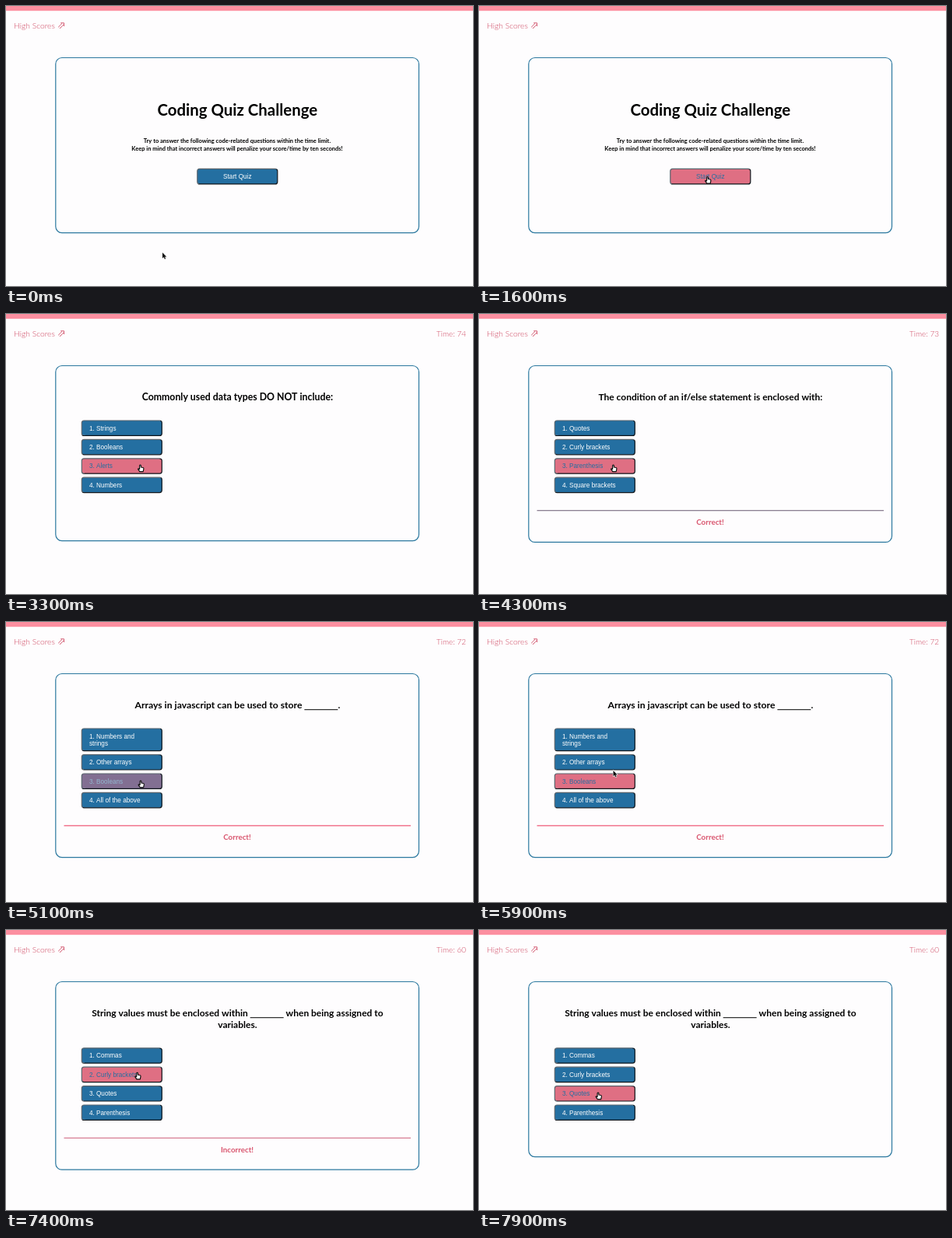
Animation of 600x360 px, one loop 8000 ms. Source, as an HTML page with a canvas:

```html
<!DOCTYPE html>
<html lang="en">
<head>
<meta charset="utf-8">
<title>Coding Quiz</title>
<style>
html, body { margin: 0; width: 100%; height: 100%; overflow: hidden; background: #fefdfe; }
canvas { display: block; }
</style>
</head>
<body>
<canvas id="stage" width="600" height="360"></canvas>
<script>
const ctx = document.getElementById('stage').getContext('2d');
const LOOP = 8000, STEP = 100, FADE = 400, MID = 297;
const BLUE = [36, 111, 161], PINK = [223, 111, 131], WHITE = [255, 255, 255];
const ROSE = '#cf4862';
const LATO = 'Lato, "Open Sans", sans-serif', ARIAL = '"Liberation Sans", Arial, sans-serif';

const screens = [
  { at: 0 },
  { at: 2000, ask: ['Commonly used data types DO NOT include:'], size: 12.3,
    options: ['Strings', 'Booleans', 'Alerts', 'Numbers'] },
  { at: 3600, ask: ['The condition of an if/else statement is enclosed with:'], size: 12,
    options: ['Quotes', 'Curly brackets', 'Parenthesis', 'Square brackets'],
    verdict: 'Correct!', rule: '#8b7f92' },
  { at: 4500, ask: ['Arrays in javascript can be used to store _.'], size: 12.2,
    options: ['Numbers and\nstrings', 'Other arrays', 'Booleans', 'All of the above'],
    verdict: 'Correct!', rule: '#f0627e' },
  { at: 6600, ask: ['String values must be enclosed within _ when being assigned to', 'variables.'], size: 12,
    options: ['Commas', 'Curly brackets', 'Quotes', 'Parenthesis'],
    verdict: 'Incorrect!', rule: '#d77f95', hide: 7700 }
];

// screen, button, pointer enters, pointer leaves
const hovers = [
  [0, 0, 1200, 2000], [1, 2, 2900, 3600], [2, 2, 3600, 4500], [3, 2, 4900, 5900],
  [3, 1, 6000, 6600], [4, 1, 6600, 7500], [4, 2, 7500, 8000]
];

// time, x, y of the pointer
const path = [
  [0, 201, 317], [600, 201, 317], [1400, 293.5, 219.5], [2700, 293.5, 219.5],
  [3200, 172.5, 194], [4600, 172.5, 194], [5000, 173, 204], [5800, 173, 204],
  [5900, 172.5, 191], [6100, 171.5, 178.5], [7300, 171.5, 178.5], [7700, 153, 209], [8000, 153, 209]
];

const arrow = new Path2D('M0 0V7.4L1.7 5.8L2.9 8.5L4.2 8L3 5.4H5.3Z');
const hand = new Path2D('M-.9 .8Q0-.6 .9 .8V3L3.6 3.5Q4.5 3.8 4.4 5L3.7 8.6H-.7L-2.9 5.4Q-2.6 4.2-.9 5.4Z');

const clamp = v => Math.max(0, Math.min(1, v));
const mix = (a, b, k) => `rgb(${a.map((v, i) => Math.round(v + (b[i] - v) * k))})`;

function write(str, x, y, font, color = '#000', align = 'center') {
  ctx.font = font;
  ctx.fillStyle = color;
  ctx.textAlign = align;
  ctx.fillText(str, x, y);
}

function box(x, y, w, h, r) {
  ctx.beginPath();
  ctx.roundRect(x, y, w, h, r);
}

function hoverLevel(screen, button, t) {
  let level = 0;
  for (const [s, b, start, end] of hovers)
    if (s === screen && b === button)
      level = Math.max(level, Math.min(clamp((t - start) / FADE), 1 - clamp((t - end) / FADE)));
  return level;
}

function button(x, y, h, label, level, centered) {
  const w = 103, cx = x + w / 2, cy = y + h / 2;
  const edge = ctx.createLinearGradient(cx - h, cy - w, cx + h, cy + w);
  edge.addColorStop(.5, '#59646d');
  edge.addColorStop(.5, '#10161c');
  box(x, y, w, h, 3);
  ctx.fillStyle = mix(BLUE, PINK, level);
  ctx.fill();
  ctx.strokeStyle = edge;
  ctx.lineWidth = 1.2;
  ctx.stroke();
  const color = mix(WHITE, BLUE, level), font = '8.2px ' + ARIAL;
  label.split('\n').forEach((line, i) =>
    write(line, centered ? cx : x + 9.6, y + 12.6 + i * 9.2, font, color, centered ? 'center' : 'left'));
}

// A "_" in the question stands for a ruled blank
function question(line, y, size) {
  const blank = 43, font = `bold ${size}px ${LATO}`;
  const parts = line.split('_');
  ctx.font = font;
  const widths = parts.map(p => ctx.measureText(p).width);
  let x = MID + .4 - (widths.reduce((a, b) => a + b) + blank * (parts.length - 1)) / 2;
  parts.forEach((part, i) => {
    if (i) {
      ctx.fillRect(x, y + 1.2, blank, 1);
      x += blank;
    }
    write(part, x, y, font, '#000', 'left');
    x += widths[i];
  });
}

function card(bottom) {
  box(63.8, 66.5, 466.7, bottom - 66.5, 8);
  ctx.strokeStyle = '#2b789f';
  ctx.lineWidth = 1.2;
  ctx.stroke();
}

function intro(t) {
  card(291.6);
  write('Coding Quiz Challenge', MID + .3, 141, 'bold 20.4px ' + LATO);
  const font = 'bold 7.5px ' + LATO;
  write('Try to answer the following code-related questions within the time limit.', MID, 176, font);
  write('Keep in mind that incorrect answers will penalize your score/time by ten seconds!', MID, 185.6, font);
  button(245.8, 209.3, 19.6, 'Start Quiz', hoverLevel(0, 0, t), true);
}

function quiz(index, t) {
  const s = screens[index];
  s.ask.forEach((line, i) => question(line, 111 + i * 15, s.size));
  let y = 137 + (s.ask.length - 1) * 14.8;
  s.options.forEach((text, i) => {
    const h = text.includes('\n') ? 28.6 : 19.4;
    button(97.3, y, h, `${i + 1}. ${text}`, hoverLevel(index, i, t));
    y += h + 5;
  });
  const shown = s.verdict && !(t >= s.hide);
  const ruleY = y + 18;
  card(shown ? ruleY + 40.8 : 291.6);
  if (shown) {
    ctx.fillStyle = s.rule;
    ctx.fillRect(74.5, ruleY - .6, 445.5, 1.3);
    write(s.verdict, MID, ruleY + 18.6, 'bold 9.8px ' + LATO, '#d9566f');
  }
  const penalty = index === 4 ? 10 : 0;
  const left = 77 - Math.floor(t / 1000) - penalty;
  write('Time: ' + left, 591, 28.6, '300 10px ' + LATO, ROSE, 'right');
}

function header() {
  ctx.fillStyle = '#fefdfe';
  ctx.fillRect(0, 0, 600, 360);
  ctx.fillStyle = '#fc8fa0';
  ctx.fillRect(0, 0, 600, 6.2);
  write('High Scores', 10, 28.6, '300 10.3px ' + LATO, ROSE, 'left');
  ctx.strokeStyle = ROSE;
  ctx.lineWidth = .9;
  ctx.stroke(new Path2D('M67.2 27.2L72 22.4M69 29L73.8 24.2M70.2 21.8H74.5V26.1'));
}

function pointer(t) {
  const i = path.findIndex((p, n) => n && t <= p[0]);
  const [t0, x0, y0] = path[i - 1], [t1, x1, y1] = path[i];
  const u = (t - t0) / (t1 - t0), k = u * u * (3 - 2 * u);
  const over = hovers.some(h => t >= h[2] && t < h[3]);
  const shape = over ? hand : arrow;
  ctx.save();
  ctx.translate(x0 + (x1 - x0) * k, y0 + (y1 - y0) * k);
  ctx.lineJoin = 'round';
  ctx.lineWidth = 1.2;
  ctx.strokeStyle = over ? '#111' : '#fff';
  ctx.fillStyle = over ? '#fff' : '#111';
  if (over) ctx.fill(shape);
  ctx.stroke(shape);
  if (!over) ctx.fill(shape);
  ctx.restore();
}

function draw(now) {
  const t = Math.floor(now % LOOP / STEP) * STEP;
  const index = screens.findLastIndex(s => t >= s.at);
  header();
  if (index) quiz(index, t);
  else intro(t);
  pointer(t);
  requestAnimationFrame(draw);
}
requestAnimationFrame(draw);
</script>
</body>
</html>
```
